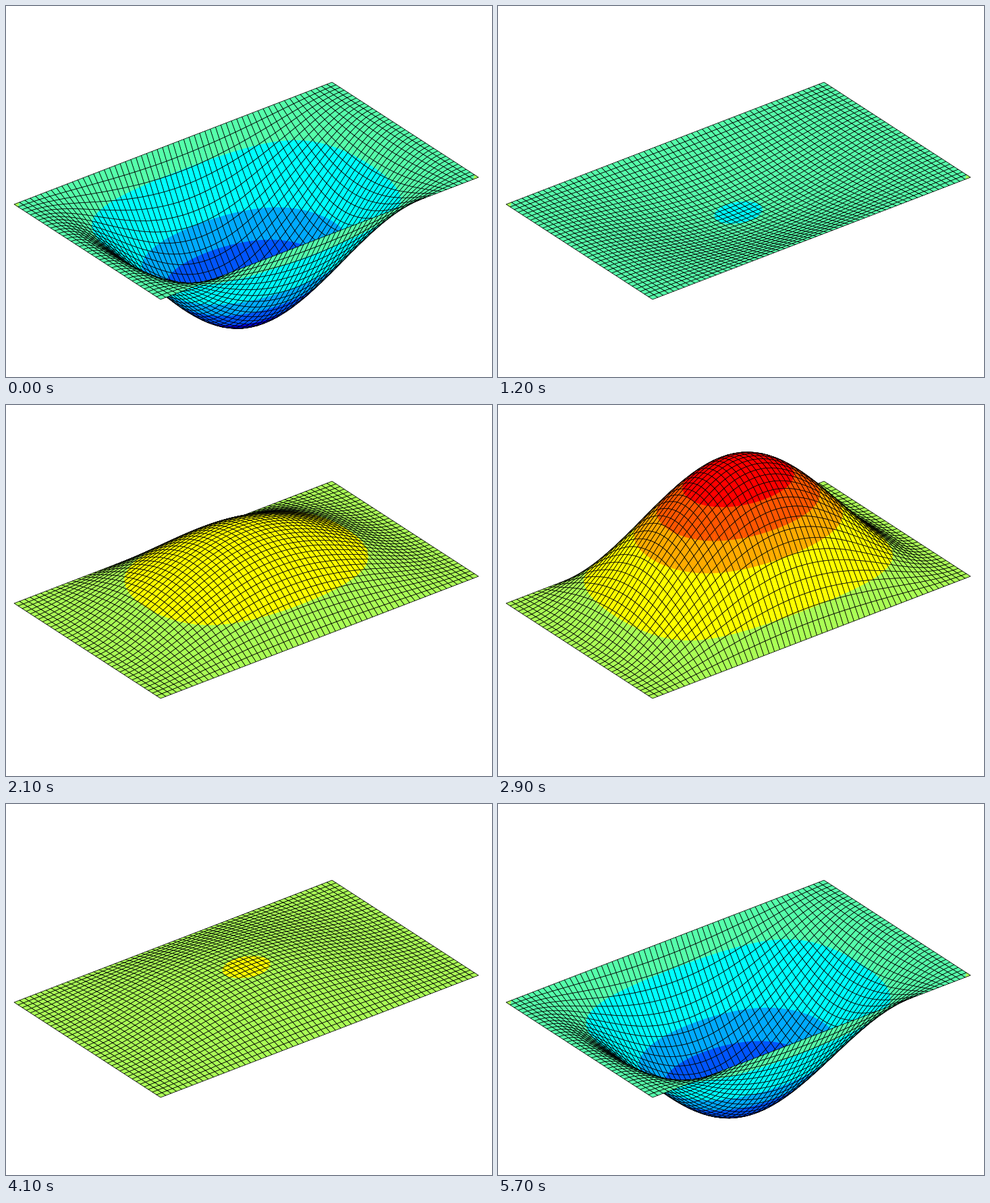
Animation, 720 px wide and 550 px high, one loop 5.8 s. Source, as a matplotlib script:

```python
import numpy as np
import matplotlib.pyplot as plt
from matplotlib.animation import FuncAnimation
from matplotlib.collections import PolyCollection

W, H, DPI = 720, 550, 100
FRAMES, INTERVAL = 58, 100
NX, NY = 60, 36
CENTER = np.array([356.0, 274.0])
U = np.array([235.5, -90.5])    # half of the long side on screen
V = np.array([108.5, 70.5])     # half of the short side on screen
ASPECT = 0.6
RISE = 193.3                    # height of the peak in pixels
BANDS = 12
LINE = 0.75 * 72 / DPI
CLEAR = (0, 0, 0, 0)
BLACK = (0, 0, 0, 1)


def jet_color(k):
    """Colour k of a twelve-step jet map."""
    ramp = lambda peak: min(1, max(0, (5 - abs(k - peak)) / 3))
    return (ramp(9), ramp(5.5 + np.sign(k - 5.5) * 0.5), ramp(2), 1)


def clamped_profile(x):
    """First mode along the long side: clamped ends, supported long edges."""
    def rate(p):
        return np.sqrt(p**2 + 2 * (np.pi / (2 * ASPECT))**2)

    lo, hi = np.pi / 2 + 1e-6, np.pi
    for _ in range(50):
        p = (lo + hi) / 2
        if p * np.tan(p) + rate(p) * np.tanh(rate(p)) < 0:
            lo = p
        else:
            hi = p
    q = rate(p)
    c = np.cos(p) / np.cosh(q)
    return (np.cos(p * x) - c * np.cosh(q * x)) / (1 - c)


JET = [jet_color(k) for k in range(BANDS)]

xi, eta = np.meshgrid(np.linspace(-1, 1, NX + 1), np.linspace(-1, 1, NY + 1))
shape = clamped_profile(xi) * np.cos(np.pi * eta / 2)
shape[[0, -1]] = 0
shape[:, [0, -1]] = 0
flat = CENTER + xi[..., None] * U + eta[..., None] * V


def cells(a):
    """Corner values of every cell, ordered from far to near."""
    quads = np.stack([a[:-1, :-1], a[:-1, 1:], a[1:, 1:], a[1:, :-1]], axis=2)
    return quads[:, ::-1].reshape(NX * NY, 4, *a.shape[2:])


def band(z):
    return np.clip(np.floor((z + 1) * BANDS / 2), 0, BANDS - 1).astype(int)


def clip_above(points, z, level):
    """Part of a polygon where the height is at least level."""
    out = []
    for i in range(len(points)):
        p, q, a, b = points[i - 1], points[i], z[i - 1], z[i]
        if (a >= level) != (b >= level):
            out.append(p + (q - p) * (level - a) / (b - a))
        if b >= level:
            out.append(q)
    return out


def contour_parts(quad, z, lo, hi):
    parts = []
    for k in range(lo + 1, hi + 1):
        level = 2 * k / BANDS - 1
        for tri in ([0, 1, 3], [1, 2, 3]):
            tz = z[tri]
            if tz.max() > level or tz.min() >= level:
                parts.append((clip_above(quad[tri], tz, level), JET[k]))
    return parts


def build(amp):
    z = amp * shape
    points = flat.copy()
    points[..., 1] -= RISE * z
    quads, heights = cells(points), cells(z)
    bands = band(heights)
    low, high = bands.min(axis=1), bands.max(axis=1)
    verts, faces, edges, widths = [], [], [], []

    def add(poly, face, edge, width):
        verts.append(poly)
        faces.append(face)
        edges.append(edge)
        widths.append(width)

    for quad, h, lo, hi in zip(quads, heights, low, high):
        parts = contour_parts(quad, h, lo, hi)
        if parts:
            add(quad, JET[lo], CLEAR, 0)
            for poly, color in parts:
                add(poly, color, CLEAR, 0)
            add(quad, CLEAR, BLACK, LINE)
        else:
            add(quad, JET[lo], BLACK, LINE)
    return verts, faces, edges, widths


fig = plt.figure(figsize=(W / DPI, H / DPI), dpi=DPI, facecolor="white")
ax = fig.add_axes([0, 0, 1, 1])
ax.set_xlim(0, W)
ax.set_ylim(H, 0)
ax.axis("off")
mesh = PolyCollection([], snap=False)
ax.add_collection(mesh, autolim=False)


def update(frame):
    amp = 1 - 2 * abs(1 - 2 * frame / FRAMES)
    verts, faces, edges, widths = build(amp)
    mesh.set_verts(verts)
    mesh.set_facecolor(faces)
    mesh.set_edgecolor(edges)
    mesh.set_linewidth(widths)
    return (mesh,)


anim = FuncAnimation(fig, update, frames=FRAMES, interval=INTERVAL,
                     init_func=lambda: (mesh,), repeat=True, repeat_delay=0)
plt.show()
```
